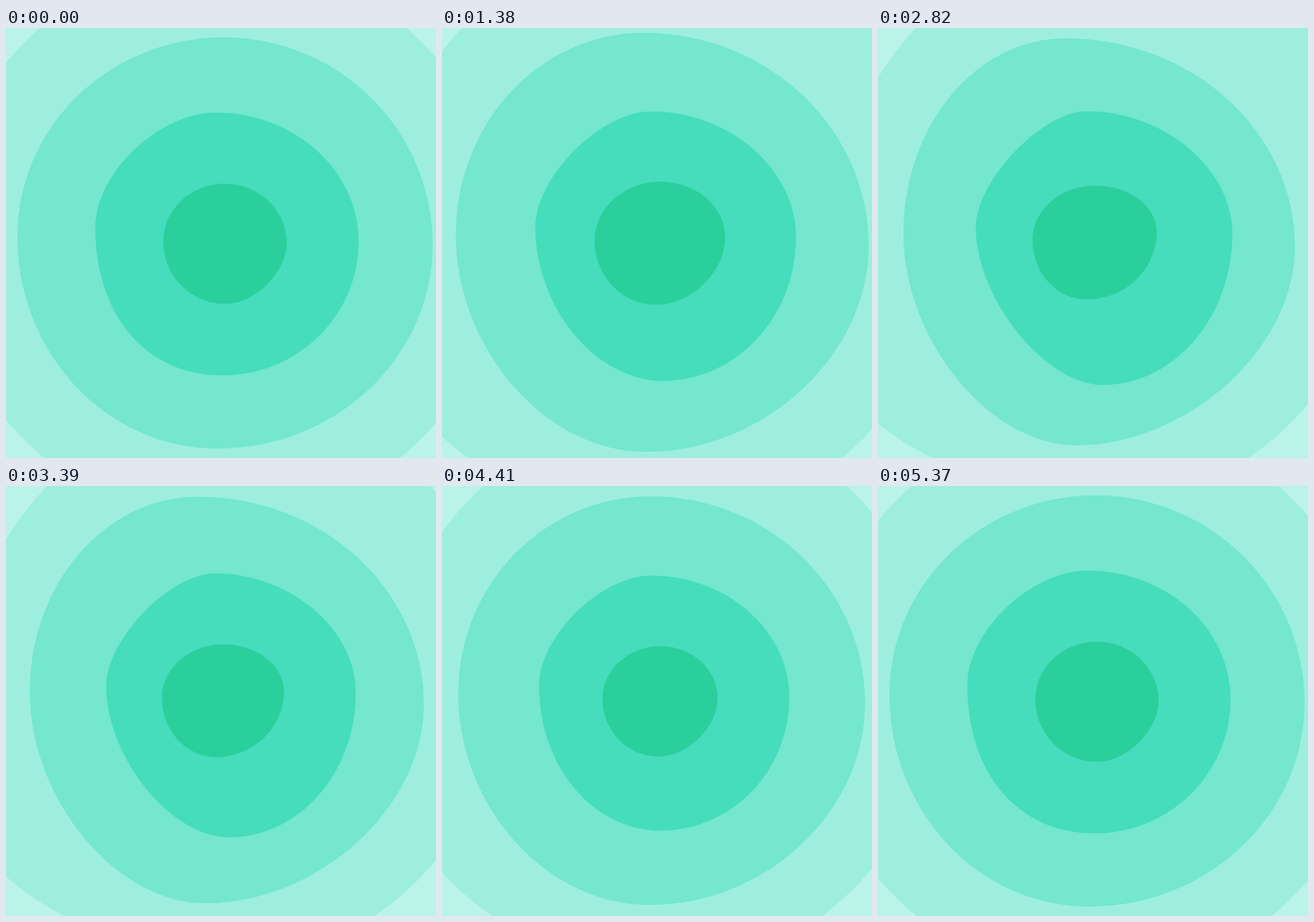
Recreate the animation shown at these times as an HTML page with a canvas. Size 540x540 px, loop 5400 ms.

```html
<!DOCTYPE html>
<html lang="en">
<head>
<meta charset="utf-8">
<title>Breathing rings</title>
<style>
  html, body { margin: 0; width: 100%; height: 100%; overflow: hidden; background: #baf3e8; }
  canvas { display: block; width: 540px; height: 540px; }
</style>
</head>
<body>
<canvas id="stage" width="540" height="540"></canvas>
<script>
const ctx = document.getElementById('stage').getContext('2d');
const LOOP = 5400, STEP = 30, CENTER = 270;
const TAU = 2 * Math.PI;
const ROUND = 0.5523; // handle length that makes a quarter ellipse

// Outlines list their right, bottom, left and top extremes as [x, y, bend],
// where bend is the roundness of the quarter arc that follows.
const rings = [
  {
    color: '#9deedf', swell: 0.04, dip: 0.022, dipAt: 3960,
    from: [[624, 268], [271, 619], [-80, 270], [273, -86]],
    to: [[625, 230], [300, 590], [-80, 350], [300, -120]]
  },
  {
    color: '#74e7ce', swell: 0.025, dip: 0.004, dipAt: 3960,
    from: [[535.5, 272], [265, 528], [14.5, 262], [273, 12]],
    to: [[523.5, 275, 0.51], [248, 524, 0.5], [32, 258], [235, 13]]
  },
  {
    color: '#45ddbb', swell: 0, dip: 0.063, dipAt: 3960,
    from: [[443, 268], [272, 436.5, 0.6], [112, 250, 0.47], [263, 106]],
    to: [[446, 258], [282, 449.5, 0.45], [122, 250, 0.4], [262, 103.5, 0.53]]
  },
  {
    color: '#2bcf9c', swell: 0.05, dip: 0.075, dipAt: 4300,
    from: [[353, 270, 0.48], [275, 347], [197, 268], [275, 195]],
    to: [[350, 256], [262, 341], [194, 266], [273, 198]]
  }
];

const lerp = (a, b, u) => a + (b - a) * u;

// Smooth pulse that is 1 at the given moment and repeats every loop.
const pulse = (time, at) => ((1 + Math.cos(TAU * (time - at) / LOOP)) / 2) ** 5;

function drawRing(ring, time) {
  const morph = (1 - Math.cos(TAU * time / LOOP)) / 2;
  const scale = 1 + ring.swell * pulse(time, LOOP / 4) - ring.dip * pulse(time, ring.dipAt);
  const place = v => CENTER + (v - CENTER) * scale;
  const nodes = ring.from.map(([x, y, bend = ROUND], i) => {
    const [toX, toY, toBend = ROUND] = ring.to[i];
    return [place(lerp(x, toX, morph)), place(lerp(y, toY, morph)), lerp(bend, toBend, morph)];
  });

  ctx.beginPath();
  ctx.moveTo(nodes[0][0], nodes[0][1]);
  nodes.forEach(([x, y, bend], i) => {
    const [nextX, nextY] = nodes[(i + 1) % 4];
    if (i % 2 === 0) {
      ctx.bezierCurveTo(x, lerp(y, nextY, bend), lerp(nextX, x, bend), nextY, nextX, nextY);
    } else {
      ctx.bezierCurveTo(lerp(x, nextX, bend), y, nextX, lerp(nextY, y, bend), nextX, nextY);
    }
  });
  ctx.fillStyle = ring.color;
  ctx.fill();
}

const start = performance.now();

function frame() {
  const elapsed = (performance.now() - start) % LOOP;
  const time = Math.floor(elapsed / STEP) * STEP;
  ctx.fillStyle = '#baf3e8';
  ctx.fillRect(0, 0, 540, 540);
  for (const ring of rings) drawRing(ring, time);
  requestAnimationFrame(frame);
}
frame();
</script>
</body>
</html>
```
